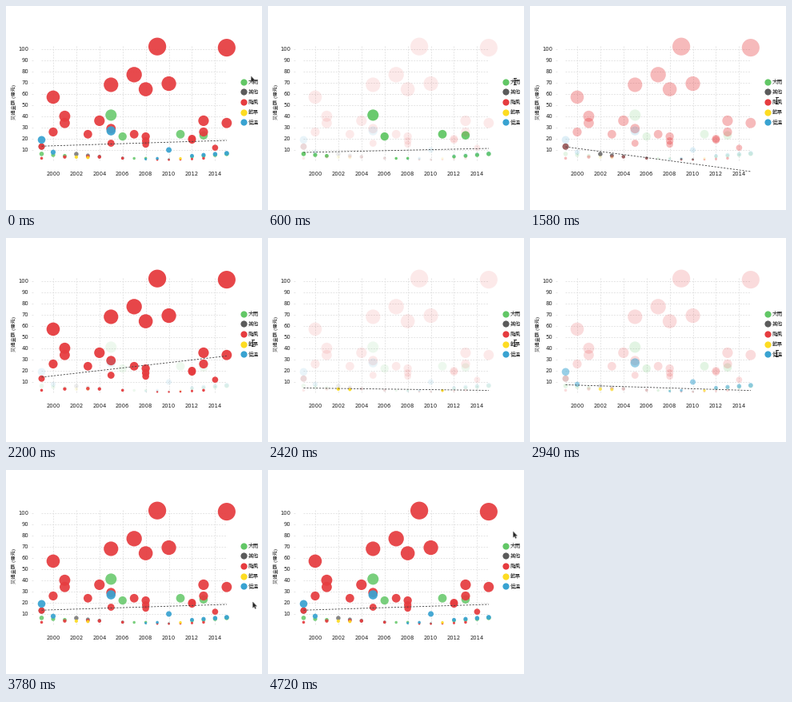
These frames come from a looping animation (320 px wide and 255 px high, 4740 ms). A matplotlib script:

```python
import math
import numpy as np
import matplotlib.pyplot as plt
from matplotlib.animation import FuncAnimation
from matplotlib.colors import to_rgb
from matplotlib.patches import Polygon

W, H, DPI = 320, 255, 80
LOOP, STEP = 4740, 20
PT = 72 / DPI  # points per pixel

plt.rcParams["font.family"] = ["DejaVu Sans", "Noto Sans CJK JP"]
fig = plt.figure(figsize=(W / DPI, H / DPI), dpi=DPI, facecolor="white")
ax = fig.add_axes([0, 0, 1, 1])
ax.set_xlim(0, W)
ax.set_ylim(H, 0)
ax.axis("off")


def px(n):
    """Column of the n-th year after 1999."""
    return 44.5 + n * 14.46


def py(value):
    return 194 - value * 1.405


# label, colour, resting opacity
GROUPS = [("大雨", "#62c766", 0.85), ("其他", "#5b5b5b", 0.72),
          ("颱風", "#e63c3f", 0.93), ("乾旱", "#fddc22", 0.9),
          ("低溫", "#39a3d1", 0.93)]
DIM, FOCUS = 0.11, 0.95

# heavy losses by year after 1999
MAJOR = [{6: [41], 7: [22], 12: [24], 14: [23]},
         {},
         {0: [13], 1: [57, 26], 2: [40, 34], 4: [24], 5: [36],
          6: [68, 29, 16], 8: [77, 24], 9: [64, 22, 18, 15], 10: [102],
          11: [69], 13: [20, 19], 14: [36, 26], 15: [12], 16: [101, 34]},
         {},
         {0: [19], 1: [8], 6: [27], 11: [10]}]

# light losses: the years they fall in, and a curve for their size
MINOR = [((0, 1, 2, 8, 9, 13, 14, 15, 16), lambda n: 2.5 + (n - 8) ** 2 / 16),
         ((0, 3, 4, 5, 7, 10, 11), lambda n: 1 + 12 * math.exp(-n / 3.7)),
         ((0, 2, 4, 5, 7, 10, 11, 12, 13, 14),
          lambda n: 2.6 + 1.5 * math.cos((n - 3.5) * math.pi / 7)),
         ((3, 4, 12), lambda n: 2 + 5 / n),
         ((9, 10, 13, 14, 15, 16), lambda n: 1.8 + 0.75 * (n - 9))]

# trend line heights at both ends; the last one covers all groups
TRENDS = np.array([(183, 178), (176.4, 215.6), (173.5, 146),
                   (187.8, 191.4), (171, 188.4), (175.2, 168)])
ALL = 5

# when the focus moves to each group in turn, then back to all
SWITCHES = [190, 730, 1470, 2130, 2800, 3430]
FADE, MOVE = 350, 160

# pointer stops: time, x, y
stops = [(0, 306.5, 88)]
for row, when in enumerate(SWITCHES[:ALL]):
    spot = (308.3, 88 + 13 * row)
    stops += [(when - MOVE, *stops[-1][1:]), (when, *spot)]
stops += [(3400, *spot), (3580, 308.5, 165), (4080, 308.5, 165),
          (4160, 324, 150), (4320, 324, 80), (4580, 306.5, 77)]
PATH = np.array(stops)
ARROW = np.array([(0, 0), (0, 7.2), (1.7, 5.7), (2.9, 8.4), (4, 7.9),
                  (2.9, 5.3), (5, 5.2)])
BEAM = np.array([(-1.6, 0), (1.6, 0), (0, 0), (0, 8), (-1.6, 8), (1.6, 8)])


def label(x, y, s, **kw):
    kw = {"ha": "center", "va": "center", "size": 6.8 * PT,
          "color": "#1c1c1c", **kw}
    ax.text(x, y, s, **kw)


def dashes(xs, ys):
    ax.plot(xs, ys, color="#dedede", lw=0.8 * PT, dashes=(2.4, 1.8), zorder=1)


for v in range(10, 101, 10):
    dashes([44, 276], [py(v)] * 2)
    dashes([32, 34], [py(v)] * 2)
    label(28, py(v), str(v), ha="right", va="center_baseline")
for n in range(1, 16, 2):
    dashes([px(n)] * 2, [50, 193])
    label(px(n), 210, str(1999 + n))
label(10, 119.8, "災損金額 (億元)", rotation=90, size=6.3 * PT)

for i, (name, color, _) in enumerate(GROUPS):
    y = 94.7 + 12.6 * i
    ax.scatter(297, y, s=(8.2 * PT) ** 2, c=color, lw=0, zorder=4)
    label(302.8, y, name, ha="left", size=6.6 * PT)

dots = []
for g, (years, size) in enumerate(MINOR):
    dots += [(n, v, g) for n, vs in MAJOR[g].items() for v in vs]
    dots += [(n, size(n), g) for n in years]
ns, vs, gs = map(np.array, zip(*dots))
rgba = np.ones((len(dots), 4))
rgba[:, :3] = [to_rgb(GROUPS[g][1]) for g in gs]
# bubble area follows the loss
bubbles = ax.scatter(px(ns), py(vs), s=(2.2 * PT) ** 2 * vs, c=rgba, lw=0,
                     zorder=3)
trend, = ax.plot([44.5, 276], TRENDS[ALL], color="#444444", lw=0.85 * PT,
                 dashes=(2.6, 2), zorder=5)
arrow = Polygon(ARROW, closed=True, fc="#222222", ec="#777777", lw=0.6 * PT,
                zorder=9)
ax.add_patch(arrow)
beam, = ax.plot(*BEAM.T, color="#222222", lw=0.9 * PT, zorder=9)


def opacity(focus):
    if focus == ALL:
        return np.array([g[2] for g in GROUPS])
    return np.where(np.arange(ALL) == focus, FOCUS, DIM)


def cubic(u):
    return 4 * u ** 3 if u < 0.5 else 1 - 4 * (1 - u) ** 3


def draw(frame):
    t = frame * STEP
    old, new, u = ALL, ALL, 1.0
    for focus, start in enumerate(SWITCHES):
        if t >= start:
            old, new, u = new, focus, min((t - start) / FADE, 1)

    p = cubic(u)
    trend.set_ydata(TRENDS[old] * (1 - p) + TRENDS[new] * p)

    f = min(max((u - 0.2) / 0.5, 0), 1)
    alpha = opacity(old) * (1 - f) + opacity(new) * f
    if ALL not in (old, new):
        # bubbles flash briefly as the pointer crosses between entries
        alpha = np.minimum(alpha + 0.3 * f * (1 - f), 1)
    rgba[:, 3] = alpha[gs]
    bubbles.set_facecolors(rgba)

    tip = [np.interp(t, PATH[:, 0], PATH[:, k]) for k in (1, 2)]
    over_text = SWITCHES[0] <= t < SWITCHES[-1]
    arrow.set_xy(ARROW + tip)
    arrow.set_visible(not over_text)
    beam.set_data(*(BEAM + tip).T)
    beam.set_visible(over_text)
    return bubbles, trend, arrow, beam


anim = FuncAnimation(fig, draw, frames=LOOP // STEP, interval=STEP,
                     init_func=lambda: draw(0), repeat=True, repeat_delay=0)
plt.show()
```
